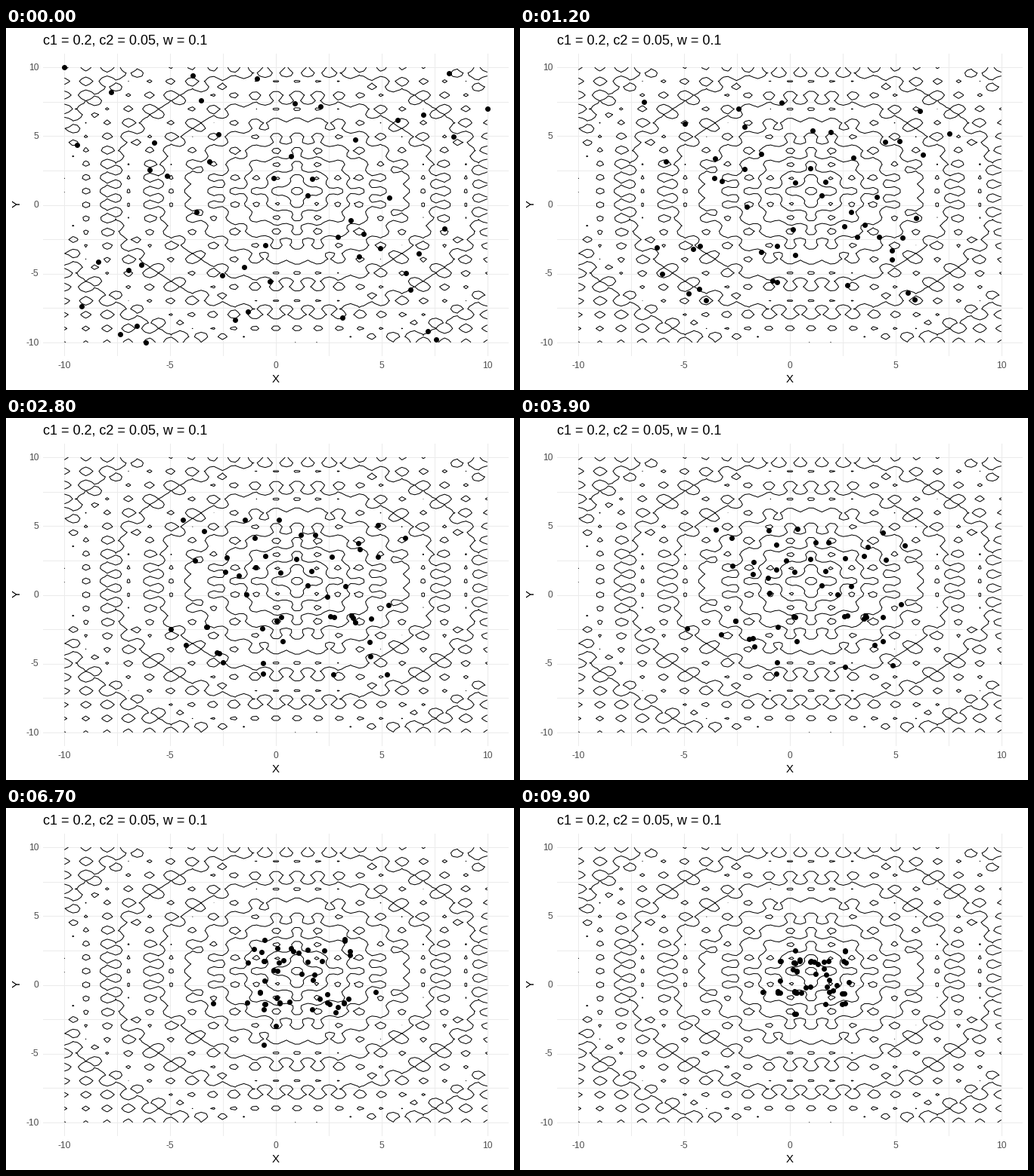
Write a matplotlib script that moves like this. It is 672x480 px and loops after 10000 ms.

```python
import numpy as np
import matplotlib.pyplot as plt
from matplotlib.animation import FuncAnimation

plt.rcParams["font.family"] = "Liberation Sans"
W, H, FRAMES = 672, 480, 100
LEFT, RIGHT, TOP, BOTTOM = 49.3, 664.7, 33.9, 435.1
LIMIT = 11
C1, C2, INERTIA = 0.2, 0.05, 0.1
PARTICLES = 50

fig = plt.figure(figsize=(7, 5), dpi=96, facecolor="white")
ax = fig.add_axes([LEFT / W, 1 - BOTTOM / H, (RIGHT - LEFT) / W, (BOTTOM - TOP) / H])
ax.set(xlim=(-LIMIT, LIMIT), ylim=(-LIMIT, LIMIT))
ax.axis("off")


def label(x, y, text, size, color="black", **kw):
    fig.text(x / W, 1 - y / H, text, size=size, color=color, **kw)


def ackley(x, y):
    """Ackley function with its minimum moved to (1, 1)."""
    bowl = -20 * np.exp(-0.2 * np.sqrt(0.5 * ((x - 1) ** 2 + (y - 1) ** 2)))
    ripple = np.exp(0.5 * (np.cos(2 * np.pi * x) + np.cos(2 * np.pi * y)))
    return bowl - ripple + np.e + 20


def swarm_path(seed):
    """Positions of all particles for every frame of a particle swarm search."""
    rng = np.random.default_rng(seed)
    pos = np.column_stack([rng.choice(side, PARTICLES, replace=False) for _ in "xy"])
    pos[0] = -0.1, 1.92  # the first leader
    vel = rng.normal(0, 0.1, pos.shape)
    own, own_val = pos.copy(), ackley(*pos.T)
    path = [pos.copy()]
    for _ in range(FRAMES - 1):
        lead = own[own_val.argmin()]
        r1, r2 = rng.random(2)
        vel = INERTIA * vel + C1 * r1 * (own - pos) + C2 * r2 * (lead - pos)
        pos = pos + vel
        val = ackley(*pos.T)
        better = val < own_val
        own[better], own_val[better] = pos[better], val[better]
        path.append(pos.copy())
    return path


# Grid, contours and labels
for v in np.arange(-10, 10.1, 2.5):
    style = dict(color="#EBEBEB", lw=0.75, antialiased=False, zorder=0)
    ax.axvline(v, **style)
    ax.axhline(v, **style)

side = np.linspace(-10, 10, 100)
gx, gy = np.meshgrid(side, side)
ax.contour(gx, gy, ackley(gx, gy), levels=np.arange(2, 20, 2), colors="black",
           linewidths=0.75, zorder=1)

for v in range(-10, 11, 5):
    px = (LEFT + RIGHT) / 2 + v * (RIGHT - LEFT) / (2 * LIMIT)
    py = (TOP + BOTTOM) / 2 - v * (BOTTOM - TOP) / (2 * LIMIT)
    label(px, 451, str(v), 9, "#4D4D4D", ha="center", va="baseline")
    label(43.5, py + 0.7, str(v), 9, "#4D4D4D", ha="right", va="center")
label(49, 22, f"c1 = {C1}, c2 = {C2}, w = {INERTIA}", 13.5, va="baseline")
label(357, 470, "X", 11.25, ha="center", va="baseline")
label(14.5, 233, "Y", 11.25, ha="center", va="center", rotation=90)

# Swarm
path = swarm_path(7)
dots, = ax.plot(*path[0].T, "o", color="black", ms=5.25, mew=0,
                antialiased=False, zorder=3)


def update(i):
    dots.set_data(*path[i].T)
    return dots,


anim = FuncAnimation(fig, update, frames=FRAMES, interval=100, repeat=True,
                     repeat_delay=0)
plt.show()
```
